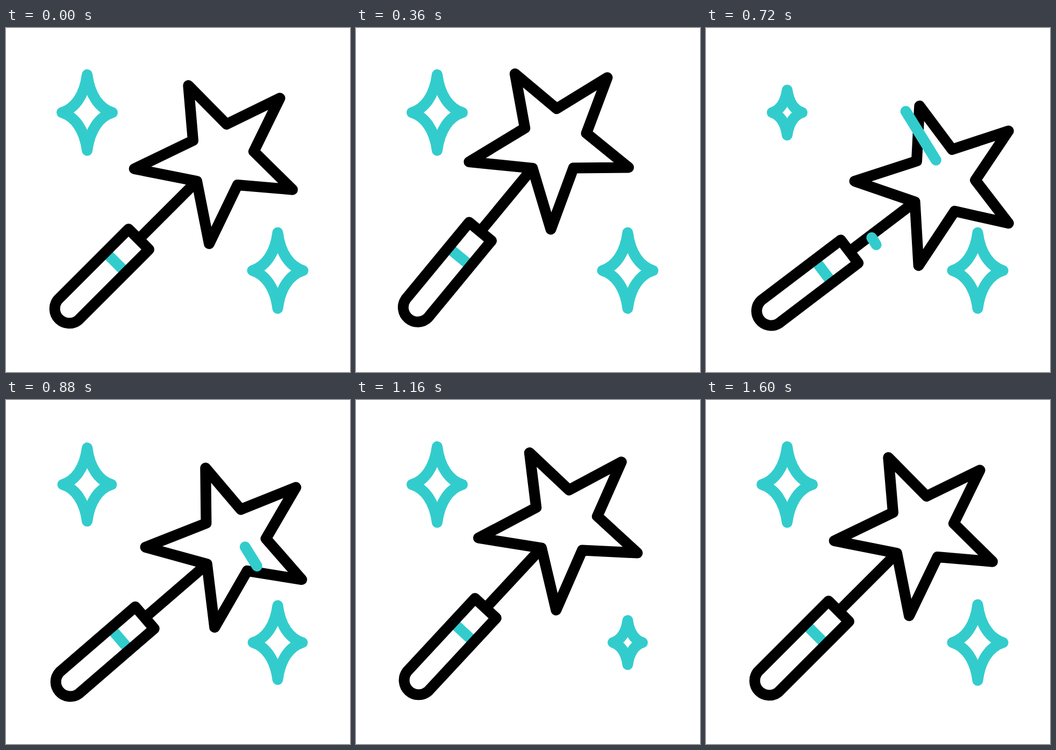
Write an HTML page that moves like this. It is 640 px wide and 640 px high and loops after 2000 ms.

```html
<!DOCTYPE html>
<html lang="en">
<head>
<meta charset="utf-8">
<title>Magic wand</title>
<style>
  html, body { margin: 0; width: 100%; height: 100%; overflow: hidden; background: #fff; }
  svg { display: block; width: 640px; height: 640px; }
  path, line {
    fill: none;
    stroke: #000;
    stroke-width: 20;
    stroke-linecap: round;
    stroke-linejoin: round;
    vector-effect: non-scaling-stroke;
  }
  .accent { stroke: #33cccc; }
  .butt { stroke-linecap: butt; }
</style>
</head>
<body>
<svg viewBox="0 0 640 640">
  <defs>
    <path id="spark" class="accent" d="M0-70.5C5-31.5 23-7.5 47 0C23 7.5 5 31.5 0 70.5C-5 31.5-23 7.5-47 0C-23-7.5-5-31.5 0-70.5Z"/>
  </defs>
  <use id="spark1" href="#spark"/>
  <use id="spark2" href="#spark"/>
  <g id="wand">
    <line class="accent butt" x1="185" y1="417" x2="223" y2="455"/>
    <path class="butt" d="M247 393L355 285"/>
    <path d="M228 374L266 412L134.8 543.2A27 27 0 0 1 96.8 505.2Z"/>
    <path d="M339.3 107L410.3 179L509.5 130.5L461 229.7L533 300.7L430.7 292L378 401.3L355 285L238.7 262L348 209.3Z"/>
  </g>
  <line id="streak1" class="accent"/>
  <line id="streak2" class="accent"/>
</svg>
<script>
const LOOP = 2000, STEP = 40;
const SWING_START = 200, SWING_TIME = 280, SWING = [0, -8, 8, -4, 2, 0];
const PIVOT = '89.5 550.5';
const DIP_TIME = 312, DIP_SCALE = 0.577;
const TRIM_TIME = 310, TRIM_LAG = 135;

const sparks = [
  { id: 'spark1', x: 151, y: 157.3, start: 340 },
  { id: 'spark2', x: 505.5, y: 451.2, start: 804 }
];
const streaks = [
  { id: 'streak1', from: [231.6, 267.8], to: [316.6, 403.3], start: 365 },
  { id: 'streak2', from: [371.3, 154.5], to: [467, 309], start: 555 }
];

const el = id => document.getElementById(id);
const clamp = v => Math.min(1, Math.max(0, v));
const mix = (a, b, p) => a + (b - a) * p;
const ease = x => x < 0.5 ? 4 * x ** 3 : 1 - 4 * (1 - x) ** 3;
const progress = (t, start, time) => ease(clamp((t - start) / time));

function swingAngle(t) {
  const last = SWING.length - 2;
  const i = Math.min(last, Math.max(0, Math.floor((t - SWING_START) / SWING_TIME)));
  return mix(SWING[i], SWING[i + 1], progress(t, SWING_START + i * SWING_TIME, SWING_TIME));
}

function drawSpark({ id, x, y, start }, t) {
  const dip = progress(t, start, DIP_TIME) - progress(t, start + DIP_TIME, DIP_TIME);
  el(id).setAttribute('transform', `translate(${x} ${y}) scale(${mix(1, DIP_SCALE, dip)})`);
}

function drawStreak({ id, from, to, start }, t) {
  const head = progress(t, start, TRIM_TIME);
  const tail = progress(t, start + TRIM_LAG, TRIM_TIME);
  const line = el(id);
  line.style.display = head > tail ? '' : 'none';
  [[1, tail], [2, head]].forEach(([n, p]) => {
    line.setAttribute('x' + n, mix(from[0], to[0], p));
    line.setAttribute('y' + n, mix(from[1], to[1], p));
  });
}

const begin = performance.now();

function draw() {
  // The motion is held in steps of 25 per second.
  const t = Math.floor((performance.now() - begin) % LOOP / STEP) * STEP;
  el('wand').setAttribute('transform', `rotate(${swingAngle(t)} ${PIVOT})`);
  sparks.forEach(s => drawSpark(s, t));
  streaks.forEach(s => drawStreak(s, t));
  requestAnimationFrame(draw);
}
draw();
</script>
</body>
</html>
```
